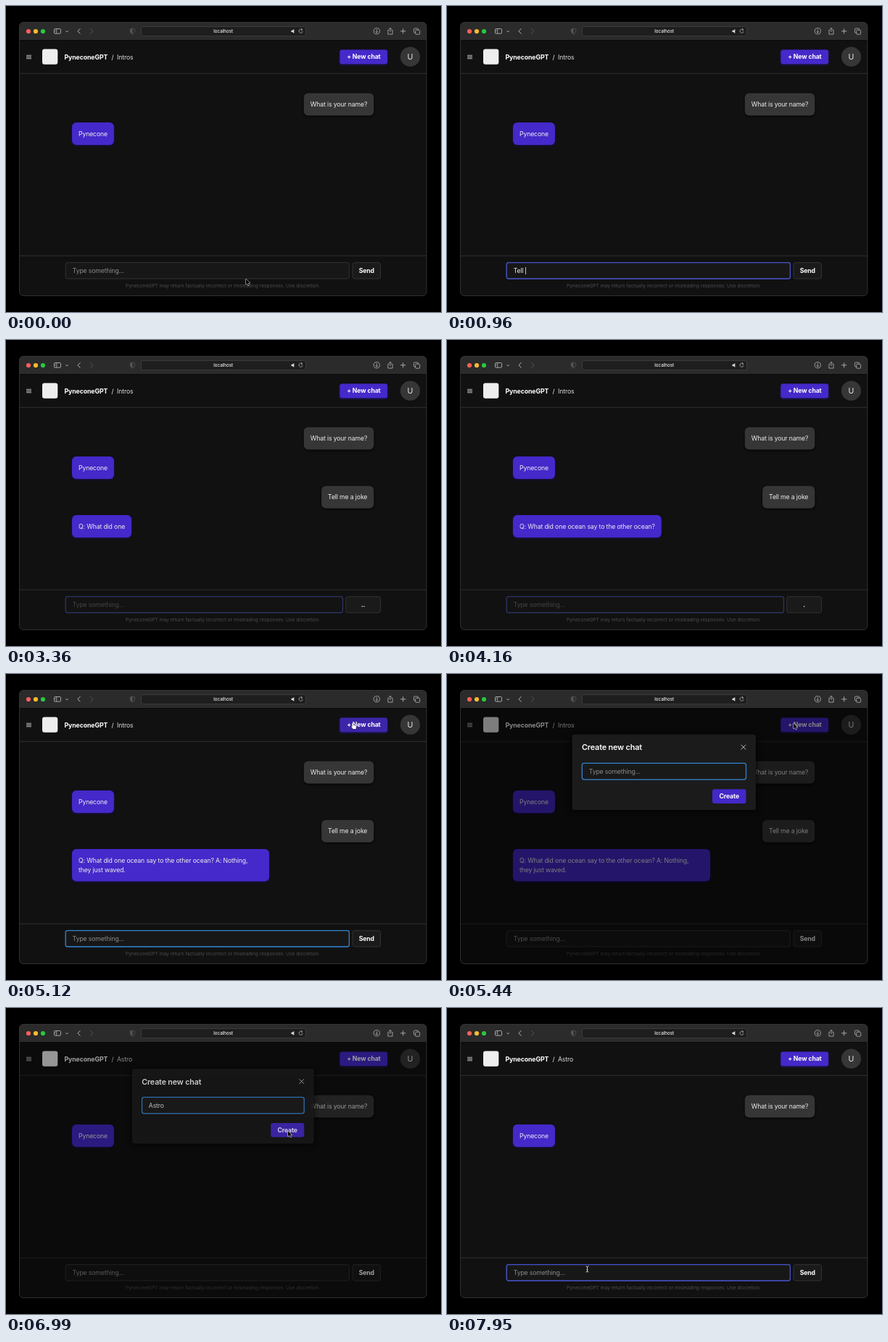
An HTML page with a canvas for the animation above (8 s loop, 600x423 px).

```html
<!DOCTYPE html>
<html lang="en">
<head>
<meta charset="utf-8">
<title>Chat app</title>
<style>
html, body { margin: 0; width: 100%; height: 100%; overflow: hidden; background: #000; }
canvas { display: block; width: 600px; height: 423px; }
</style>
</head>
<body>
<canvas id="stage"></canvas>
<script>
const LOOP = 8000;
const W = 600, H = 423;
const canvas = document.getElementById('stage');
const ctx = canvas.getContext('2d');
const dpr = window.devicePixelRatio || 1;
canvas.width = W * dpr;
canvas.height = H * dpr;

const PURPLE = '#4529ca', GREY = '#363636', PANEL = '#1a1a1a', EDGE = '#363636';
const PROMPT = 'Tell me a joke';
const CHAT = 'Astro';
const ANSWER = [
  'Q: What did one ocean say to the other ocean? A: Nothing,'.split(' '),
  'they just waved.'.split(' ')
];

// Times of the events, in ms
const FOCUS = 420, TYPE = 510, KEY = 110, SEND = 2590, STREAM = 2990, WORD = 120;
const READY = 4700, OPEN = 5250, CLOSE = 6930, REFOCUS = 7750;
const NAME_KEYS = [5600, 5700, 5810, 6090, 6180];

const MOVES = [
  { from: 30, to: 380, a: [331, 377.5], b: [320, 366] },
  { from: 4640, to: 5030, a: [320, 366], b: [478, 68] },
  { from: 6420, to: 6800, a: [478, 68], b: [389, 170] },
  { from: 7120, to: 7700, a: [389, 170], b: [193.5, 361] }
];

const clamp = v => Math.max(0, Math.min(1, v));
const ramp = (t, start, length) => clamp((t - start) / length);
const ease = p => p * p * (3 - 2 * p);
const pulse = (t, on, off, length) => ease(ramp(t, on, length)) - ease(ramp(t, off, length));
const blinkOn = (t, last) => Math.floor((t - last) / 500) % 2 === 0;

function box(x, y, w, h, r, fill, stroke, line = 1) {
  ctx.beginPath();
  ctx.roundRect(x, y, w, h, r);
  if (fill) { ctx.fillStyle = fill; ctx.fill(); }
  if (stroke) { ctx.strokeStyle = stroke; ctx.lineWidth = line; ctx.stroke(); }
}

function disc(x, y, r, fill) {
  ctx.beginPath();
  ctx.arc(x, y, r, 0, 7);
  ctx.fillStyle = fill;
  ctx.fill();
}

function stroke(d, color, line = 0.9) {
  ctx.strokeStyle = color;
  ctx.lineWidth = line;
  ctx.stroke(new Path2D(d));
}

function setFont(size, weight, gap) {
  ctx.font = `${weight} ${size}px Inter, "Open Sans", sans-serif`;
  ctx.letterSpacing = gap + 'px';
}

// Text centred vertically on y
function text(s, x, y, { color = '#eee', size = 8.7, weight = 400, gap = -0.13, align = 'left' } = {}) {
  setFont(size, weight, gap);
  ctx.textAlign = align;
  ctx.fillStyle = color;
  ctx.fillText(s, x, y + size * 0.36);
}

function textWidth(s) {
  setFont(8.7, 400, -0.13);
  return ctx.measureText(s).width;
}

function withShadow(color, blur, draw) {
  ctx.save();
  ctx.shadowColor = color;
  ctx.shadowBlur = blur * dpr;
  ctx.shadowOffsetY = dpr;
  draw();
  ctx.restore();
}

function faded(alpha, draw) {
  ctx.save();
  ctx.globalAlpha *= alpha;
  draw();
  ctx.restore();
}

function toolbar() {
  ctx.fillStyle = '#2b2b2b';
  ctx.fillRect(18, 22, 563, 25.5);
  ['#fe5f57', '#febc2e', '#28c840'].forEach((c, i) => disc(31 + 10 * i, 35, 3.1, c));
  const icon = '#b5b5b5', dim = '#555';
  box(66.5, 31.5, 9, 6.6, 1.2, null, icon, 0.9);
  stroke('M69.7 31.5V38M67.6 33.4H68.7M67.6 35H68.7', icon, 0.7);
  stroke('M82.3 34.3L84 36L85.7 34.3', icon);
  stroke('M102.4 31.2L99 34.8L102.4 38.4', icon, 1);
  stroke('M116.5 31.2L119.9 34.8L116.5 38.4', dim, 1);
  stroke('M174.5 31L177.7 32V35Q177.5 37.5 174.5 39Q171.5 37.5 171.3 35V32Z', dim, 0.8);
  ctx.fillStyle = dim;
  ctx.fill(new Path2D('M174.5 31V39Q171.5 37.5 171.3 35V32Z'));
  box(186.5, 28.5, 227, 13, 2.5, '#1e1e1e', '#404040', 0.8);
  text('localhost', 299.7, 35, { size: 6.2, weight: 500, gap: 0, align: 'center', color: '#f0f0f0' });
  ctx.fillStyle = '#ddd';
  ctx.fill(new Path2D('M393.5 33.7H395L397.3 31.9V37.7L395 36H393.5Z'));
  stroke('M408.7 33A2.6 2.6 0 1 0 409.2 35.2M407 31.2L408.9 32.9L406.9 34.2', icon, 0.8);
  ctx.beginPath();
  ctx.arc(511.3, 34.7, 4.1, 0, 7);
  ctx.strokeStyle = icon;
  ctx.lineWidth = 0.8;
  ctx.stroke();
  stroke('M511.3 32.3V37M509.5 35.3L511.3 37.1L513.1 35.3', icon, 0.8);
  stroke('M528.6 33.3H526.9V39H533.1V33.3H531.4M530 36V30.4M528.3 32L530 30.3L531.7 32', icon, 0.8);
  stroke('M547.7 31.2V38.4M544.1 34.8H551.3', icon, 0.9);
  box(562.5, 31, 6, 6, 1.2, null, icon, 0.8);
  box(564.7, 33.2, 6, 6, 1.2, '#2b2b2b', icon, 0.8);
}

function header(t, over) {
  stroke('M28 68.3H35M28 70.5H35M28 72.7H35', '#ddd', 0.9);
  box(50, 59.5, 21.3, 21.3, 3, '#eeeeee');
  text('PyneconeGPT', 80.5, 70.5, { weight: 700, size: 8.8, color: '#fff' });
  text('/', 145.6, 70.5);
  text(t < CLOSE ? 'Intros' : CHAT, 153, 70.5, { color: '#ddd' });
  withShadow('#2a1a90', 3, () => box(460.5, 60.5, 65.5, 19.5, 2.8, over ? '#3d25a8' : PURPLE));
  text('+ New chat', 493.4, 70.3, { weight: 700, align: 'center', color: '#fff' });
  disc(557.5, 70.2, 13.6, GREY);
  text('U', 557.5, 70.3, { size: 10.6, gap: 0, align: 'center' });
}

function bubble(lines, y, mine, wide) {
  const w = wide ? 272 : textWidth(lines[0]) + 18;
  const h = lines[0] ? 17.5 + 13.5 * lines.length : 17.5;
  const x = mine ? 507.3 - w : 91;
  withShadow(mine ? '#000' : '#1c1060', 3, () => box(x, y, w, h, 6, mine ? GREY : PURPLE));
  lines.forEach((s, i) => text(s, x + 9, y + 15.5 + 13.5 * i));
}

function chat(t) {
  bubble(['What is your name?'], 120.6, true);
  bubble(['Pynecone'], 161.1, false);
  if (t < SEND || t >= CLOSE) return;
  bubble([PROMPT], 201.7, true);
  const count = Math.max(0, Math.floor((t - STREAM) / WORD) + 1);
  const first = ANSWER[0].slice(0, count).join(' ');
  const second = ANSWER[1].slice(0, Math.max(0, count - ANSWER[0].length)).join(' ');
  bubble(second ? [first, second] : [first], 241.9, false, !!second);
}

function field(x, y, w, h, focus, over, fill) {
  box(x, y, w, h, 2.8, fill, over ? '#4a4a4a' : EDGE, 0.9);
  if (focus > 0) faded(focus, () => box(x, y, w, h, 2.8, null, over ? '#434fcb' : '#3182ce', 1.3));
}

function value(s, x, y, caret) {
  text(s, x, y);
  if (!caret) return;
  ctx.fillStyle = '#eee';
  ctx.fillRect(x + textWidth(s) + 0.3, y - 5, 0.8, 10);
}

function sendLabel(t) {
  if (t < SEND || t >= READY) return 'Send';
  return '.'.repeat(1 + Math.floor((t - SEND) / 400) % 3);
}

function composer(t, over) {
  const busy = t >= SEND && t < READY;
  const off = pulse(t, SEND, READY, 200);
  const focus = pulse(t, FOCUS, OPEN, 150) + ease(ramp(t, REFOCUS, 150));
  faded(1 - 0.6 * off, () => {
    field(82.2, 354.7, busy ? 382.3 : 391.2, 22.3, focus, over, '#171717');
    const keys = Math.floor((t - TYPE) / KEY) + 1;
    if (keys > 0 && t < SEND) {
      const last = TYPE + KEY * (PROMPT.length - 1);
      value(PROMPT.slice(0, keys), 91.7, 366, t < last || blinkOn(t, last));
    } else {
      text('Type something...', 91.7, 366, { color: '#8c8c8c' });
    }
  });
  const x = busy ? 468.7 : 478;
  box(x, 354.7, 516.5 - x, 22.3, 2.8, PANEL, EDGE, 0.9);
  text(sendLabel(t), (x + 516.5) / 2, 366, { weight: 700, align: 'center', color: '#fff' });
  text('PyneconeGPT may return factually incorrect or misleading responses. Use discretion.',
    299, 386.5, { size: 6.7, gap: -0.03, align: 'center', color: '#4c4c4c' });
}

function dialog(t, over) {
  const open = pulse(t, OPEN, CLOSE, 200);
  if (open <= 0) return;
  ctx.fillStyle = `rgba(0,0,0,${0.48 * open})`;
  ctx.fillRect(18, 47.5, 563, 354);
  ctx.save();
  ctx.globalAlpha = open;
  const scale = 0.95 + 0.05 * open;
  ctx.translate(299, 136);
  ctx.scale(scale, scale);
  ctx.translate(-299, -136);
  withShadow('#000', 8, () => box(172.5, 83.5, 253.5, 104.5, 3.5, '#1c1c1c'));
  text('Create new chat', 186, 101.5, { size: 10.8, weight: 600, gap: -0.14, color: '#fff' });
  stroke('M405.6 97.8L412.2 104.4M412.2 97.8L405.6 104.4', '#ccc', 0.9);
  field(186.3, 123.3, 226.2, 22.6, 1, false, '#1a1a1a');
  const keys = NAME_KEYS.filter(k => k <= t).length;
  if (keys) value(CHAT.slice(0, keys), 195.7, 134.7, blinkOn(t, NAME_KEYS[keys - 1]));
  else text('Type something...', 195.7, 134.7, { color: '#8c8c8c' });
  box(366, 159.3, 46.5, 19.6, 2.8, over ? '#3d25a8' : PURPLE);
  text('Create', 389.2, 169.2, { weight: 700, align: 'center', color: '#fff' });
  ctx.restore();
}

function pointer(t) {
  const m = MOVES.filter(m => m.from <= t).pop() || MOVES[0];
  const p = ease(ramp(t, m.from, m.to - m.from));
  return m.a.map((a, i) => a + (m.b[i] - a) * p);
}

function drawPointer(x, y, kind) {
  ctx.save();
  ctx.translate(x, y);
  ctx.lineJoin = 'round';
  if (kind === 'beam') {
    const d = 'M-2-4Q0-4 0-2.8Q0-4 2-4M0-3V3M-2 4Q0 4 0 2.8Q0 4 2 4M-1 .8H1';
    stroke(d, '#000', 1.8);
    stroke(d, '#e8e8e8', 0.9);
  } else {
    const hand = kind === 'hand';
    const path = new Path2D(hand
      ? 'M0 0Q1-.4 1.2.7L1.5 3Q2.4 2.4 2.8 3.3Q3.8 2.9 4.1 3.8Q5.2 3.6 5.2 4.8L4.7 8H.7L-1.8 4.8Q-1.7 3.7-.3 4.6L-.8.8Q-.8.2 0 0Z'
      : 'M0 0V7.6L1.8 6L3 8.8L4.3 8.3L3.1 5.5H5.5Z');
    ctx.strokeStyle = hand ? '#111' : '#fff';
    ctx.lineWidth = 1;
    ctx.stroke(path);
    ctx.fillStyle = hand ? '#fff' : '#000';
    ctx.fill(path);
  }
  ctx.restore();
}

function draw(t) {
  ctx.setTransform(dpr, 0, 0, dpr, 0, 0);
  ctx.fillStyle = '#000';
  ctx.fillRect(0, 0, W, H);

  const [px, py] = pointer(t);
  const within = (x, y, w, h) => px > x && px < x + w && py > y && py < y + h;
  const modal = t >= OPEN && t < CLOSE;
  const overInput = !modal && within(82, 354, 391, 23);
  const overNew = !modal && within(460, 60, 66, 20);
  const overCreate = modal && within(366, 159, 47, 20);

  ctx.save();
  ctx.beginPath();
  ctx.roundRect(18.5, 22.5, 561.5, 378, 5.5);
  ctx.clip();
  ctx.fillStyle = '#111';
  ctx.fillRect(18, 22, 563, 380);
  toolbar();
  ctx.fillStyle = '#000';
  ctx.fillRect(18, 47, 563, 0.7);
  ctx.fillStyle = '#333';
  ctx.fillRect(18, 92.8, 563, 0.9);
  ctx.fillRect(18, 344.8, 563, 0.9);
  header(t, overNew);
  chat(t);
  composer(t, overInput);
  dialog(t, overCreate);
  ctx.restore();
  box(18.5, 22.5, 561.5, 378, 5.5, null, '#3c3c3c', 0.8);

  if (t < TYPE || (t > MOVES[1].from && t < NAME_KEYS[0]) || t > MOVES[2].from) {
    drawPointer(px, py, overInput ? 'beam' : overNew || overCreate ? 'hand' : 'arrow');
  }
}

const start = performance.now();
function tick() {
  draw((performance.now() - start) % LOOP);
  requestAnimationFrame(tick);
}
tick();
</script>
</body>
</html>
```
